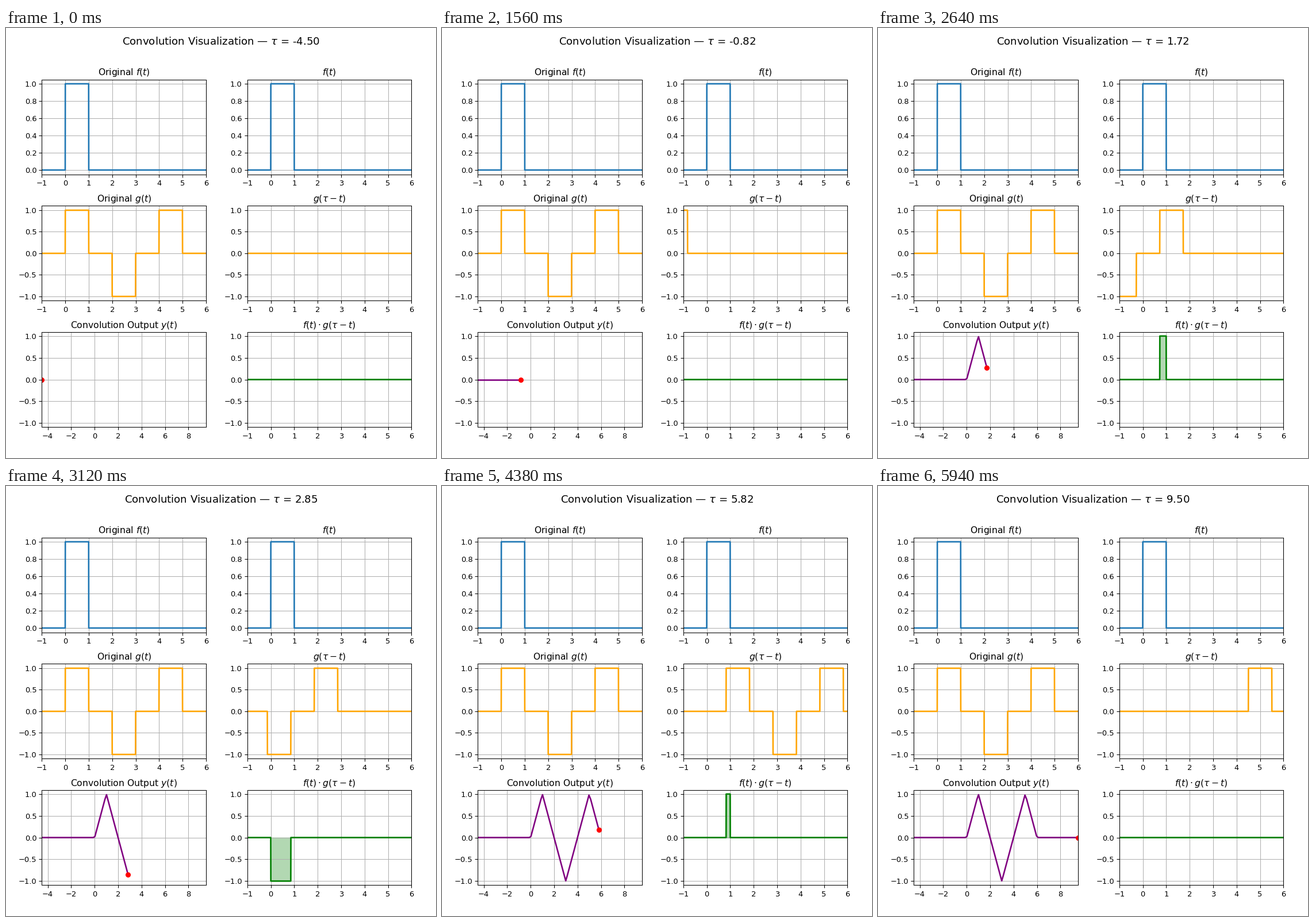
These frames come from a looping animation (748x748 px, 6 s). A matplotlib script:

```python
import numpy as np
import matplotlib.pyplot as plt
from matplotlib.animation import FuncAnimation

INCHES, DPI = 8, 93.5
SIZE = INCHES * DPI
FRAMES, INTERVAL = 100, 60

# Panel geometry in pixels
LEFTS = (62.4, 419.9)
TOP, PITCH = 89.55, 219.93
WIDTH, HEIGHT = 285.5, 165


def box(t, start):
    return ((t >= start) & (t < start + 1)).astype(float)


def f(t):
    return box(t, 0)


def g(t):
    return box(t, 0) - box(t, 2) + box(t, 4)


def triangle(t, center):
    return np.maximum(0, 1 - np.abs(t - center))


t = np.linspace(-5, 10, 3001)
taus = np.linspace(-4.5, 9.5, FRAMES)
# Convolving unit boxes gives unit triangles
y = triangle(taus, 1) - triangle(taus, 3) + triangle(taus, 5)

fig = plt.figure(figsize=(INCHES, INCHES), dpi=DPI)


def panel(row, col, title, ylim, xlim=(-1, 6)):
    bottom = SIZE - TOP - row * PITCH - HEIGHT
    ax = fig.add_axes([v / SIZE for v in (LEFTS[col], bottom, WIDTH, HEIGHT)])
    ax.set(title=title, xlim=xlim, ylim=ylim)
    ax.grid(True)
    return ax


f_lim, g_lim = (-0.05, 1.05), (-1.1, 1.1)
y_lim = (y.min() - 0.1, y.max() + 0.1)

panel(0, 0, "Original $f(t)$", f_lim).plot(t, f(t), lw=2)
panel(0, 1, "$f(t)$", f_lim).plot(t, f(t), lw=2)
panel(1, 0, "Original $g(t)$", g_lim).plot(t, g(t), color="orange", lw=2)
ax_shift = panel(1, 1, r"$g(\tau - t)$", g_lim)
ax_out = panel(2, 0, "Convolution Output $y(t)$", y_lim, (taus[0], taus[-1]))
ax_prod = panel(2, 1, r"$f(t) \cdot g(\tau - t)$", y_lim)

shift_line, = ax_shift.plot([], [], color="orange", lw=2)
prod_line, = ax_prod.plot([], [], color="green", lw=2)
out_line, = ax_out.plot([], [], color="purple", lw=2)
dot, = ax_out.plot([], [], "ro")
heading = fig.suptitle("", fontsize=14)
fill = None


def update(i):
    global fill
    tau = taus[i]
    shifted = g(tau - t)
    product = f(t) * shifted
    shift_line.set_data(t, shifted)
    prod_line.set_data(t, product)
    if fill is not None:
        fill.remove()
    fill = ax_prod.fill_between(t, product, color="green", alpha=0.3)
    out_line.set_data(taus[:i + 1], y[:i + 1])
    dot.set_data([tau], [y[i]])
    heading.set_text(rf"Convolution Visualization — $\tau$ = {tau:.2f}")
    return shift_line, prod_line, fill, out_line, dot, heading


anim = FuncAnimation(fig, update, frames=FRAMES, interval=INTERVAL,
                     init_func=lambda: update(0), repeat=True, repeat_delay=0)
plt.show()
```
